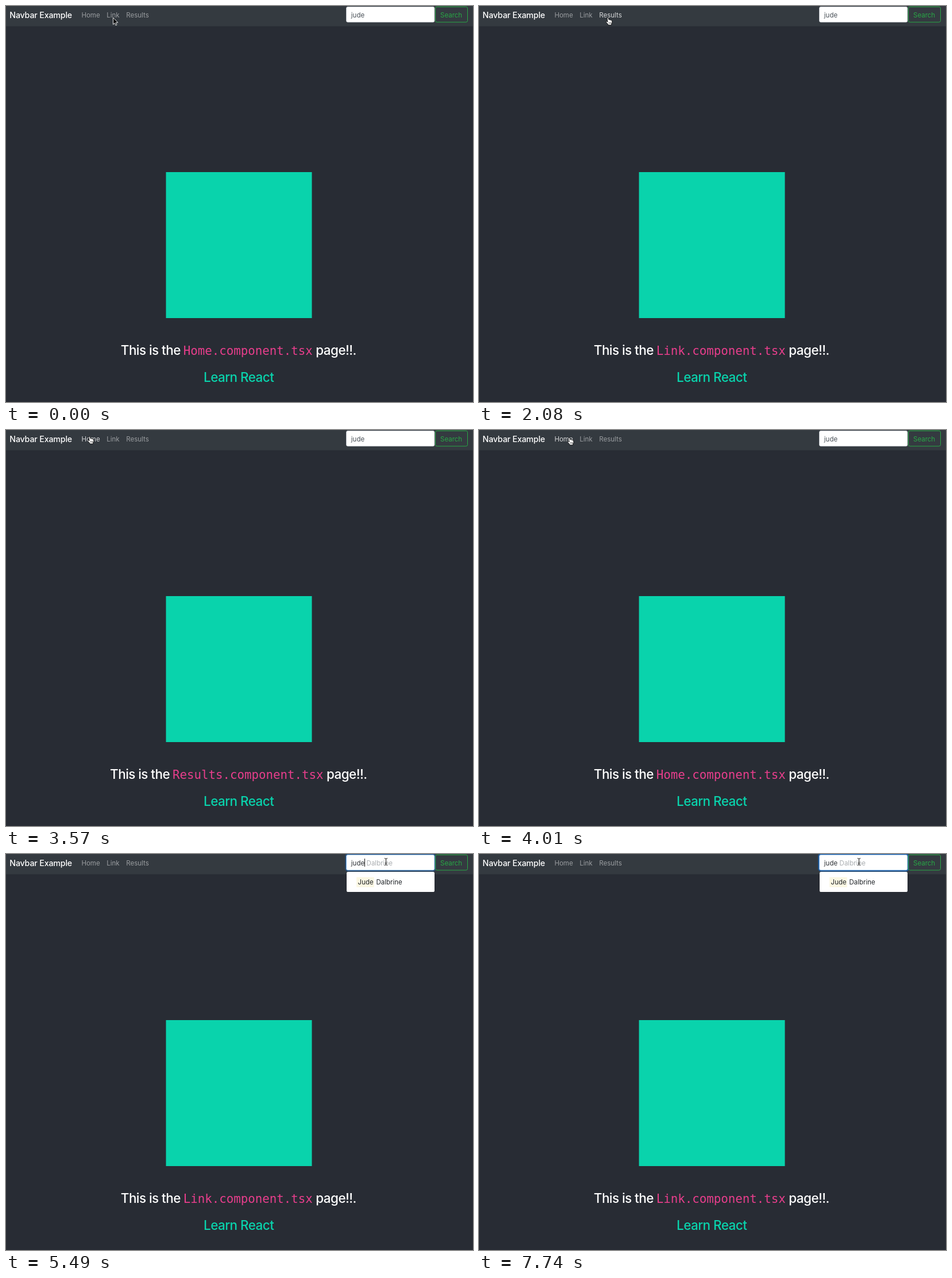
Write an HTML page that moves like this. It is 813 px wide and 689 px high and loops after 8 s.

```html
<!DOCTYPE html>
<html lang="en">
<head>
<meta charset="utf-8">
<title>Navbar Example</title>
<style>
  html, body { margin: 0; width: 100%; height: 100%; overflow: hidden; background: #282c34; }
  svg { display: block; width: 813px; height: 689px; font-family: Inter, Roboto, sans-serif; font-size: 11.5px; font-optical-sizing: none; }
  text { white-space: pre; }
  .brand { font-size: 14.2px; font-weight: 450; letter-spacing: -.15px; fill: #fff; }
  .big { font-size: 22.4px; font-weight: 450; letter-spacing: -.52px; fill: #fff; }
  .code { font-family: "DejaVu Sans Mono", monospace; font-size: 20.76px; fill: #e83e8c; }
</style>
</head>
<body>
<svg viewBox="0 0 813 689">
  <rect width="813" height="689" fill="#282c34"/>
  <rect width="813" height="35.3" fill="#343a40"/>
  <text class="brand" x="6.3" y="20.5">Navbar Example</text>
  <g fill="#fff">
    <text id="navHome" x="131.4" y="19.7">Home</text>
    <text id="navLink" x="175.2" y="19.7">Link</text>
    <text id="navResults" x="209.3" y="19.7">Results</text>
  </g>

  <rect id="ring" x="591.4" y="0" width="156" height="29.4" rx="4" fill="none" stroke="#007bff" stroke-width="2.3"/>
  <rect id="field" x="592.5" y="1.5" width="153.4" height="26.6" rx="2.6" fill="#fff" stroke-width=".8"/>
  <text id="ghost" x="627.6" y="19.7" fill="#a9adb0">Dalbrine</text>
  <text id="query" x="600.8" y="19.7"></text>
  <rect id="caret" y="8" width="1" height="14" fill="#111"/>
  <rect x="747.5" y="1.5" width="56" height="26.6" rx="2.6" fill="none" stroke="#28a745"/>
  <text x="756" y="19.7" fill="#28a745">Search</text>

  <g id="menu">
    <rect x="593" y="31" width="153" height="35" rx="2.6" fill="#fff"/>
    <rect id="active" x="593" y="37.3" width="153" height="22.7" fill="#007bff"/>
    <rect x="610.2" y="40.3" width="30.6" height="17.4" fill="#fcf8e3"/>
    <text x="612.6" y="53.2" fill="#212529">Jude</text>
    <text id="surname" x="644.4" y="53.2">Dalbrine</text>
  </g>

  <rect x="278.5" y="289" width="254" height="254" fill="#09d3ac"/>

  <text id="before" class="big" y="607">This is the</text>
  <text id="file" class="code" y="607"></text>
  <text id="after" class="big" y="607">page!!.</text>
  <text class="big" x="344" y="654" style="fill:#09d3ac">Learn React</text>

  <g id="pointer">
    <path id="arrow" d="M.5 .3V12.1L3.2 9.6L5.1 13.7L6.9 12.9L5.1 8.9H8.9Z" fill="#000" stroke="#fff" stroke-width=".9" stroke-linejoin="round"/>
    <g id="hand" fill="#fff" stroke="#000" stroke-width=".8" stroke-linejoin="round">
      <path d="M-1 .9Q.2 -.6 1.2 .8L2 4Q3.2 3.1 4 4.3Q5.2 3.6 6 4.9Q7.4 4.5 7.7 6V8.8L6.6 11V13H.7V11.7L-2.8 7.9Q-2.7 6.3 -1.2 6.9L.1 7.9Z"/>
      <path d="M2.2 8.2V10.8M3.9 8.2V10.8M5.5 8.2V10.8" fill="none" stroke-width=".6"/>
    </g>
    <g id="beam" fill="none" stroke-linecap="round">
      <path d="M-2.2 -6Q0 -6 0 -4.6V4.6Q0 6 -2.2 6M2.2 -6Q0 -6 0 -4.6V4.6Q0 6 2.2 6M-1.3 2.5H1.3" stroke="#fff" stroke-width="2"/>
      <path d="M-2.2 -6Q0 -6 0 -4.6V4.6Q0 6 -2.2 6M2.2 -6Q0 -6 0 -4.6V4.6Q0 6 2.2 6M-1.3 2.5H1.3" stroke="#111"/>
    </g>
  </g>
</svg>
<script>
const LOOP = 8000;
const el = {};
document.querySelectorAll('[id]').forEach(node => { el[node.id] = node; });

// time, pointer shape, x, y, hovered link
const pointerKeys = [
  [0, 'arrow', 186, 20, ''],
  [150, 'arrow', 186, 19, ''],
  [300, 'arrow', 186, 18, ''],
  [740, 'hand', 188, 20, 'Link'],
  [1640, 'hand', 192, 20, 'Link'],
  [1790, 'arrow', 203, 20, ''],
  [1930, 'hand', 216, 20, 'Results'],
  [2080, 'hand', 224, 20, 'Results'],
  [3270, 'hand', 214, 18, 'Results'],
  [3420, 'hand', 180, 14, 'Link'],
  [3570, 'hand', 145, 11, 'Home'],
  [4010, 'hand', 157, 13, 'Home'],
  [4160, 'hand', 177, 15, 'Link'],
  [4760, 'arrow', 527.5, -8, 'Results'],
  [4900, 'arrow', 578, 1, ''],
  [5050, 'beam', 628, 9, ''],
  [5200, 'beam', 661.5, 13.5, '']
];
const pageKeys = [[0, 'Home'], [1040, 'Link'], [2830, 'Results'], [3870, 'Home'], [4460, 'Link']];

const at = (keys, t) => keys.filter(k => k[0] <= t).pop();
const between = (t, a, b) => t >= a && t < b;
const show = (node, on) => node.setAttribute('visibility', on ? 'inherit' : 'hidden');

function drawPointer(t) {
  const [, shape, x, y, hover] = at(pointerKeys, t);
  el.pointer.setAttribute('transform', `translate(${x} ${y})`);
  for (const name of ['arrow', 'hand', 'beam']) show(el[name], name === shape);
  for (const name of ['Home', 'Link', 'Results']) {
    el['nav' + name].setAttribute('fill-opacity', name === hover ? .8 : .5);
  }
}

function drawPage(t) {
  const page = at(pageKeys, t)[1];
  const shift = page === 'Results' ? 18.7 : 0;
  el.file.textContent = page + '.component.tsx';
  el.before.setAttribute('x', 199.8 - shift);
  el.file.setAttribute('x', 308.8 - shift);
  el.after.setAttribute('x', 539.3 + shift);
}

function drawSearch(t) {
  const open = t >= 5490;
  const chosen = between(t, 6690, 7290);
  const ghost = open && !chosen;
  const caret = between(t, 5490, 5940) || between(t, 6540, 7740);
  el.query.textContent = chosen ? 'Jude Dalbrine' : 'jude';
  el.query.setAttribute('fill', ghost ? '#2c3035' : '#495057');
  el.caret.setAttribute('x', chosen ? 677 : 624);
  el.surname.setAttribute('fill', chosen ? '#fff' : '#212529');
  el.field.setAttribute('stroke', open ? '#80bdff' : '#ced4da');
  el.ring.setAttribute('stroke-opacity', !open ? 0 : t < 5640 ? .25 : .45);
  show(el.ghost, ghost);
  show(el.caret, caret);
  show(el.menu, open);
  show(el.active, chosen);
}

function draw(now) {
  const t = now % LOOP;
  drawPointer(t);
  drawPage(t);
  drawSearch(t);
}

const start = performance.now();
function tick() {
  draw(performance.now() - start);
  requestAnimationFrame(tick);
}
draw(0);
requestAnimationFrame(tick);
</script>
</body>
</html>
```
